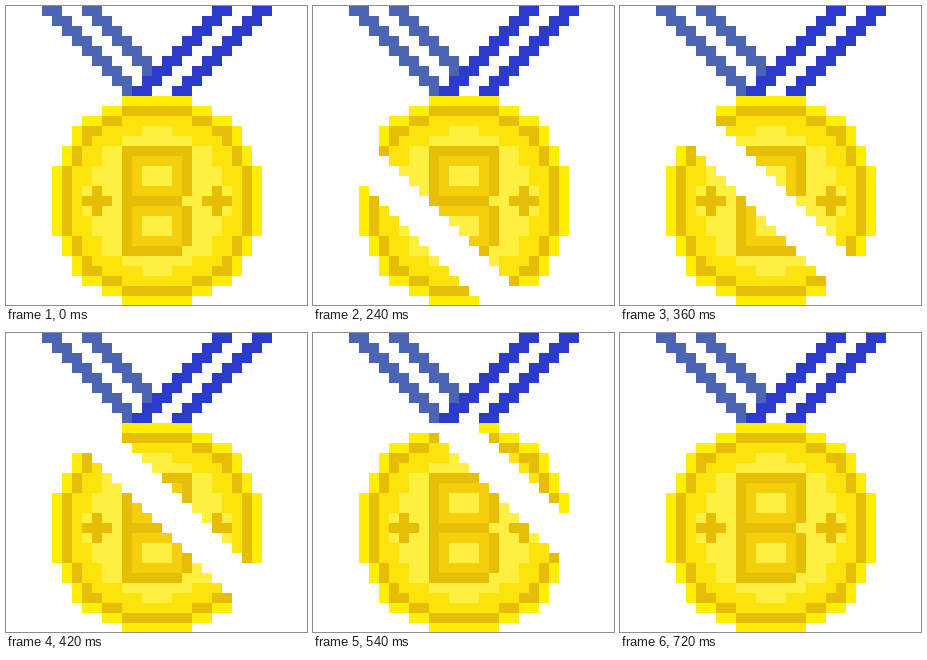
These frames come from a looping animation (301x299 px, 0.78 s). An HTML page with a canvas:

```html
<!DOCTYPE html>
<html lang="en">
<head>
<meta charset="utf-8">
<title>Medal</title>
<style>
html, body { margin: 0; width: 100%; height: 100%; overflow: hidden; background: #fff; }
canvas { display: block; }
</style>
</head>
<body>
<canvas id="stage" width="301" height="299"></canvas>
<script>
const ctx = document.getElementById('stage').getContext('2d');
const CELL = 10, LEFT = 46, TOP = 90, SIZE = 21;
const STEP_MS = 60, STEPS = 13;
const LIGHT_BLUE = '#4c64b4', BLUE = '#2b3bcb';
const RIM = '#ffee00', DARK = '#e6be08', INNER = '#fde30c', PALE = '#ffef40', GOLD = '#f5cf0c';

// First filled column of each row, from the top down to the middle row.
const DISCS = [
  [RIM, 0, [7, 5, 3, 2, 2, 1, 1, 0, 0, 0, 0]],
  [DARK, 1, [7, 5, 3, 3, 2, 2, 1, 1, 1, 1]],
  [INNER, 2, [7, 5, 4, 3, 3, 2, 2, 2, 2]],
  [PALE, 3, [9, 7, 5, 5, 4, 4, 3, 3]]
];

const grid = Array.from({ length: SIZE }, () => Array(SIZE).fill(null));

function block(color, col, row, w = 1, h = 1) {
  for (let r = row; r < row + h; r++)
    for (let c = col; c < col + w; c++) grid[r][c] = color;
}

function disc(color, top, starts) {
  starts.forEach((col, i) => {
    const row = top + i, w = SIZE - 2 * col;
    block(color, col, row, w);
    block(color, col, SIZE - 1 - row, w);
  });
}

function plus(col, row) {
  block(DARK, col - 1, row, 3);
  block(DARK, col, row - 1, 1, 3);
}

function letterB() {
  block(DARK, 7, 5, 6, 11);
  block(DARK, 13, 5, 1, 5);
  block(DARK, 13, 11, 1, 4);
  for (const row of [6, 11]) {
    block(GOLD, 8, row, 5, 4);
    block(PALE, 9, row + 1, 3, 2);
  }
}

function ribbon(color, x, dir, rows) {
  ctx.fillStyle = color;
  for (let i = 0; i < rows; i++) ctx.fillRect(x + dir * i * CELL, i * CELL, 2 * CELL, CELL);
}

function draw(step) {
  ctx.fillStyle = '#fff';
  ctx.fillRect(0, 0, 301, 299);
  ribbon(LIGHT_BLUE, 36, 1, 9);
  ribbon(LIGHT_BLUE, 76, 1, 7);
  ribbon(BLUE, 206, -1, 9);
  ribbon(BLUE, 246, -1, 9);

  // A five-cell diagonal gap sweeps three cells per step.
  const gap = 3 * step - 20;
  grid.forEach((line, r) => line.forEach((color, c) => {
    const d = c - r - gap;
    if (!color || (d >= 0 && d < 5)) return;
    ctx.fillStyle = color;
    ctx.fillRect(LEFT + c * CELL, TOP + r * CELL, CELL, CELL);
  }));
}

DISCS.forEach(d => disc(...d));
plus(4, 10);
plus(16, 10);
letterB();

function frame() {
  draw(Math.floor(performance.now() / STEP_MS) % STEPS);
  requestAnimationFrame(frame);
}
frame();
</script>
</body>
</html>
```
